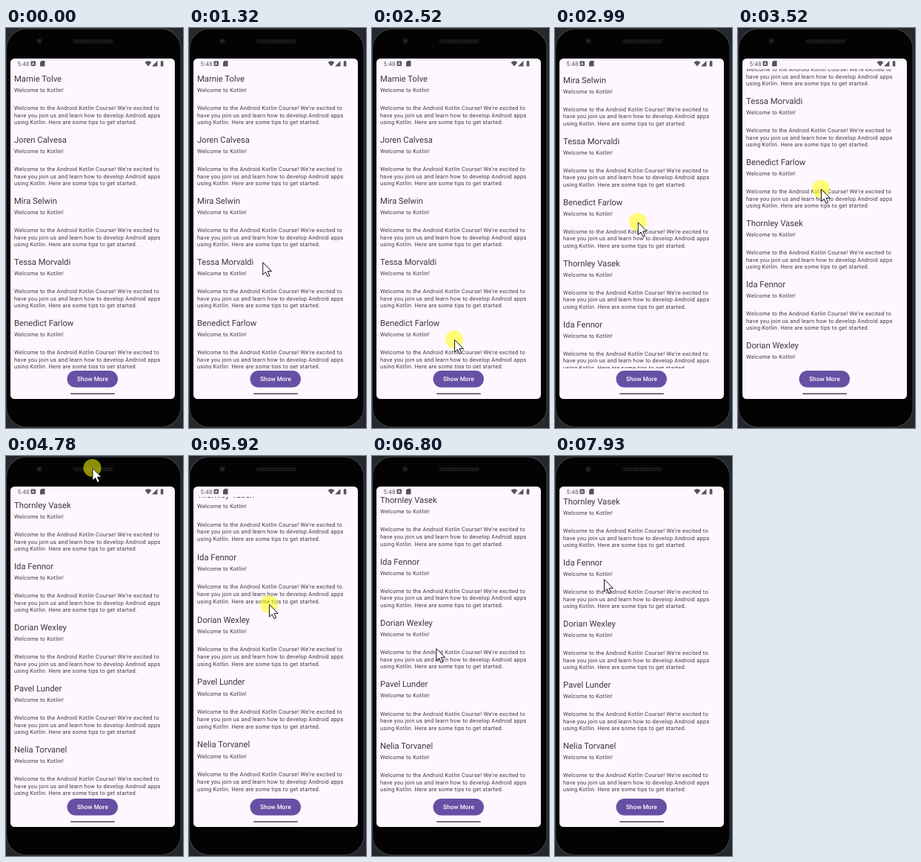
An HTML page that plays this animation: 239x537 px, repeating every 8 s.

```html
<!DOCTYPE html>
<html lang="en">
<head>
<meta charset="utf-8">
<title>Course messages</title>
<style>
html, body { margin: 0; width: 100%; height: 100%; overflow: hidden; background: #26272a; }
svg { display: block; width: 100vw; height: 100vh; font-family: Roboto, sans-serif; text-rendering: geometricPrecision; }
#list { fill: #3a373f; }
.name { font-size: 11.28px; }
.body { font-size: 7.52px; letter-spacing: .235px; }
</style>
</head>
<body>
<svg viewBox="0 0 239 537">
  <defs>
    <clipPath id="view"><rect x="6" y="55" width="222" height="402"/></clipPath>
    <pattern id="mesh" width="3" height="3" patternUnits="userSpaceOnUse">
      <rect width="3" height="3" fill="#0c0c0d"/><circle cx="1.5" cy="1.5" r=".9" fill="#2b2b2d"/>
    </pattern>
  </defs>
  <rect width="239" height="537" fill="#26272a"/>
  <rect x=".5" y="1" width="235.7" height="535" rx="27" fill="#030304" stroke="#363940" stroke-width="1.4"/>
  <circle cx="45" cy="17.5" r="3.8" fill="#17181a"/>
  <circle cx="45" cy="17.5" r="1.6" fill="#2b2d33"/>
  <rect x="91" y="15" width="54" height="5.5" rx="2.7" fill="url(#mesh)"/>
  <rect x="6" y="41" width="222" height="457" rx="5.5" fill="#fef7ff"/>

  <g fill="#56545a">
    <text x="15.5" y="50.5" font-size="8" letter-spacing=".2">5:48</text>
    <rect x="33.5" y="44.5" width="6.5" height="6.5" rx="1"/>
    <path d="M35.2 49.7l1.5-3.8 1.5 3.8M35.8 48.5h1.8" fill="none" stroke="#fef7ff" stroke-width=".8"/>
    <path d="M48 44h4.5v7.5h-6.5v-5.5z"/>
    <path d="M187.5 46q4.5-3.4 9 0l-4.5 5.5z"/>
    <path d="M204.5 44v7.5h-7.5z"/>
    <path d="M208.8 44.8h1v-.9h1.6v.9h1v6.7h-3.6z"/>
  </g>

  <g clip-path="url(#view)"><g id="list"></g></g>

  <rect x="82.5" y="460" width="68.5" height="22.5" rx="11.25" fill="#6750a4"/>
  <text x="117" y="474" font-size="8.2" font-weight="500" letter-spacing=".05" text-anchor="middle" fill="#fff">Show More</text>
  <rect x="87" y="490.2" width="60" height="1.6" rx=".8" fill="#49464c"/>

  <g id="pointer">
    <circle id="halo" r="12" fill="#ffff08" opacity=".55"/>
    <path d="M.5 .5V17L4.3 13.4L7 19.5L9.7 18.3L7 12.3H12.3Z" fill="#fff" stroke="#18181c"/>
  </g>
</svg>
<script>
const LOOP = 8000, STEP = 200 / 3, START = 520;
const PITCH = 82, BOTTOM = 457, MAX_SCROLL = 417;
const SLOP = 5, LAG = 40;
const names = ['Marnie Tolve', 'Joren Calvesa', 'Mira Selwin', 'Tessa Morvaldi', 'Benedict Farlow',
  'Thornley Vasek', 'Ida Fennor', 'Dorian Wexley', 'Pavel Lunder', 'Nelia Torvanel'];
const tips = [
  'Welcome to the Android Kotlin Course! We’re excited to',
  'have you join us and learn how to develop Android apps',
  'using Kotlin. Here are some tips to get started.'
];

const entry = { x: 215, y: 463 };
const moves = [
  { from: 520, to: 920, x: 97, y: 291 },
  { from: 1253, to: 2060, x: 111, y: 437 },
  { from: 2480, to: 3400, x: 112, y: 216 },
  { from: 3520, to: 4180, x: 103, y: 122 },
  { from: 4390, to: 4880, x: 117, y: 12 },
  { from: 5190, to: 5600, x: 110, y: 270 },
  { from: 5600, to: 5920, x: 108, y: 199 },
  { from: 6590, to: 7330, x: 61, y: 327 },
  { from: 7540, to: 7930, x: 66, y: 165 }
];
const scrollDrag = { down: 2250, up: 5100 };
const stretchDrag = { down: 5600, up: 6580 };

const $ = id => document.getElementById(id);
const list = $('list'), pointer = $('pointer'), halo = $('halo');
const clamp = (v, lo, hi) => Math.min(hi, Math.max(lo, v));
const easeOut = p => 1 - (1 - p) ** 2;

function addText(cls, y, str) {
  const el = document.createElementNS('http://www.w3.org/2000/svg', 'text');
  el.setAttribute('class', cls);
  el.setAttribute('x', 11);
  el.setAttribute('y', y);
  el.textContent = str;
  list.append(el);
}

names.forEach((name, i) => {
  const top = i * PITCH;
  addText('name', top + 72, name);
  addText('body', top + 86, 'Welcome to Kotlin!');
  tips.forEach((tip, row) => addText('body', top + 110 + row * 9.6, tip));
});

function cursorAt(t) {
  let { x, y } = entry;
  for (const m of moves) {
    const p = easeOut(clamp((t - m.from) / (m.to - m.from), 0, 1));
    x += (m.x - x) * p;
    y += (m.y - y) * p;
  }
  return { x, y };
}

// How far up the finger has pulled the list during a press
function pulled(t, { down, up }) {
  const end = clamp(t - LAG, down, up);
  return Math.max(0, cursorAt(down).y - cursorAt(end).y - SLOP);
}

const isDown = (t, { down, up }) => t >= down && t < up;

function draw(time) {
  const t = START + Math.floor((time - START) / STEP + .1) * STEP;
  const { x, y } = cursorAt(t);
  const scroll = Math.min(MAX_SCROLL, pulled(t, scrollDrag));
  const relax = Math.exp(-Math.max(0, t - stretchDrag.up) / 120);
  const scale = 1 + pulled(t, stretchDrag) * relax * .00037;

  list.setAttribute('transform',
    `matrix(1 0 0 ${scale} 0 ${BOTTOM - scale * (BOTTOM + scroll)})`);
  pointer.setAttribute('transform', `translate(${x} ${y})`);
  pointer.style.display = time < START ? 'none' : '';
  halo.style.display = isDown(t, scrollDrag) || isDown(t, stretchDrag) ? '' : 'none';
}

function tick() {
  draw(performance.now() % LOOP);
  requestAnimationFrame(tick);
}
tick();
</script>
</body>
</html>
```
